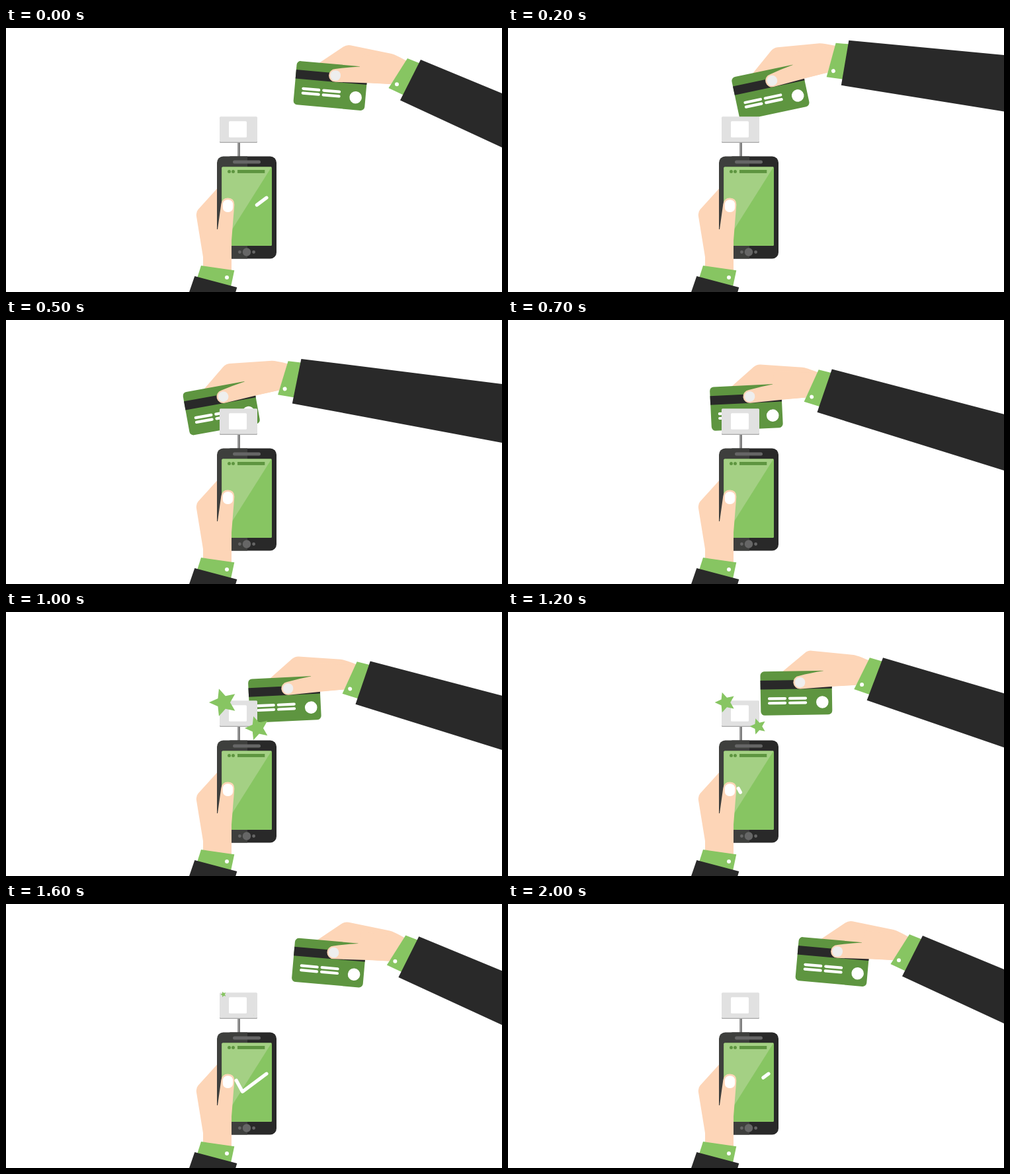
An HTML page that plays this animation: 750x400 px, repeating every 2.1 s.

```html
<!DOCTYPE html>
<html lang="en">
<head>
<meta charset="utf-8">
<title>Card payment</title>
<style>
  html, body { margin: 0; width: 100%; height: 100%; overflow: hidden; background: #fff; }
  svg { display: block; width: 750px; height: 400px; }
  .skin { fill: #fdd5b7; }
  .green { fill: #87c562; }
  .deep { fill: #5e9540; }
  .dark { fill: #292929; }
  .grey { fill: #666; }
  .white { fill: #fff; }
  .line { fill: none; stroke: #fff; stroke-linecap: round; stroke-linejoin: round; }
</style>
</head>
<body>
<svg viewBox="0 0 750 400">
  <g id="arm">
    <path class="skin" d="M470 56 L475 52 L510 28.5 Q515 25 521 26.2 L583 39 Q588 40 606 50 L582 85 L500 80Z"/>
    <g transform="translate(440.1 49.6) rotate(5.1)">
      <rect class="deep" width="108" height="66.5" rx="6"/>
      <rect class="dark" y="13.5" width="108" height="13.5"/>
      <path class="line" stroke-width="4.2" d="M13 41.2H37M44 41.2H68M13 48H37M44 48H68"/>
      <circle class="white" cx="93.2" cy="47.5" r="9.3"/>
    </g>
    <path class="skin" d="M535 58.5 Q515 59.5 498 62 A9.9 9.9 0 0 0 498 81.8 L551 83.5 L582 85 L606 50 L540 40Z"/>
    <rect x="490.4" y="64.2" width="15.6" height="15.6" rx="7.4" fill="#eee"/>
    <path class="green" d="M607 46 L627 54 L602 102 L578.5 91Z"/>
    <circle class="white" cx="591" cy="85.3" r="3"/>
    <path id="sleeve" class="dark"/>
  </g>

  <rect x="350" y="173" width="4" height="22" fill="#999"/>
  <rect x="352" y="173" width="2" height="22" fill="#7d7d7d"/>
  <rect x="323" y="136" width="57" height="38" rx="1.5" fill="#a6a6a6"/>
  <rect x="323" y="134.3" width="57" height="38.5" rx="1.5" fill="#e1e1e1"/>
  <rect class="white" x="337" y="141.3" width="27" height="24.5" rx="1.5"/>

  <rect class="dark" x="330" y="194.5" width="79" height="155" rx="9.5"/>
  <path fill="#3e3f3d" d="M365 194.5 H328.5 A9.5 9.5 0 0 0 319 204 V340 A9.5 9.5 0 0 0 328.5 349.5 H365Z"/>
  <rect class="grey" x="343" y="200.5" width="42" height="5" rx="2.5"/>
  <rect class="green" x="326.3" y="210.5" width="75.7" height="119.5" rx="1.5"/>
  <path fill="#a4d084" d="M326.3 212 Q326.3 210.5 327.8 210.5 H401.5 L326.3 330Z"/>
  <g class="deep">
    <circle cx="337.5" cy="217.4" r="2.5"/>
    <circle cx="343.5" cy="217.4" r="2.5"/>
    <rect x="350" y="215" width="41.3" height="4.9"/>
  </g>
  <g class="grey">
    <circle cx="353.4" cy="339.5" r="2.4"/>
    <circle cx="364" cy="339.5" r="6.2"/>
    <circle cx="374.6" cy="339.5" r="2.4"/>
  </g>
  <path id="check" class="line" stroke-width="5.2" pathLength="1" d="M348.2 267.3 L357.5 284.3 L394 257.2"/>

  <path class="skin" d="M319 243.5 L290.5 275 Q287 279 288 285.5 L298 347 V363 L341 368 V322 L345.3 268 Q345.5 257.5 335.5 257.5 Q326.5 257.5 325.3 267 L320 305 H319Z"/>
  <rect class="white" x="327.8" y="260.2" width="15.4" height="18.8" rx="7"/>
  <path class="green" d="M295 360 L345.3 367.3 L340 392 L289 379Z"/>
  <circle class="white" cx="334" cy="378" r="3"/>
  <path class="dark" d="M285.3 376 L349.3 393 L347 401 H276.7Z"/>

  <path id="starA" class="green"/>
  <path id="starB" class="green"/>
</svg>
<script>
const LOOP = 2100, STEP = 100;

// Arm poses: x and y of the card's emblem, rotation in degrees.
const REST = [528.5, 105, 0];
const SWIPE_FROM = [379.7, 144.5, -7.85];
const SWIPE_TO = [461, 144.5, -7.85];
const approach = [
  { at: 0, pose: REST },
  { at: 100, pose: [487, 88.6, -9] },
  { at: 200, pose: [438, 102.3, -17.1] },
  { at: 400, pose: [364.5, 133, -20.8] },
  { at: 600, pose: SWIPE_FROM }
];

const byId = id => document.getElementById(id);
const ramp = (t, from, to) => Math.min(1, Math.max(0, (t - from) / (to - from)));
const ease = (t, from, to) => {
  const k = ramp(t, from, to);
  return k * k * (3 - 2 * k);
};
const mix = (a, b, k) => a.map((v, i) => v + (b[i] - v) * k);

// Smooth curve through the keys, with slopes taken from each key's neighbours.
function spline(keys, t) {
  const n = Math.min(keys.length - 2, keys.findLastIndex(key => key.at <= t));
  const slope = (j, i) => {
    const a = keys[Math.max(0, j - 1)], b = keys[Math.min(keys.length - 1, j + 1)];
    return (b.pose[i] - a.pose[i]) / (b.at - a.at);
  };
  const a = keys[n], b = keys[n + 1], span = b.at - a.at;
  const k = (t - a.at) / span, s = ease(k, 0, 1);
  return mix(a.pose, b.pose, s).map((v, i) =>
    v + span * k * (1 - k) * ((1 - k) * slope(n, i) - k * slope(n + 1, i)));
}

function armPose(t) {
  if (t < 600) return spline(approach, t);
  if (t < 1000) return mix(SWIPE_FROM, SWIPE_TO, ramp(t, 600, 1000));
  const [x, y] = mix(SWIPE_TO, REST, ease(t, 1000, 1680));
  return [x, y, SWIPE_TO[2] * (1 - ease(t, 1000, 1640))];
}

function drawArm(t) {
  const [x, y, turn] = armPose(t);
  byId("arm").setAttribute("transform",
    `translate(${x} ${y}) rotate(${turn}) translate(${-REST[0]} ${-REST[1]})`);

  // The sleeve's lower edge opens slightly as the arm lifts.
  const angle = (24.9 + .0046 * turn * turn) * Math.PI / 180;
  const far = [596 + 500 * Math.cos(angle), 109.5 + 500 * Math.sin(angle)];
  byId("sleeve").setAttribute("d", `M627 48 L1077 234.5 L${far} L596 109.5Z`);
}

// The tick is drawn, then wiped from its start; the wipe runs on into the next loop.
function drawCheck(t) {
  const carried = t < 1000;
  const from = ramp(carried ? t + 1955 : t, 1700, 2055);
  const to = carried ? 1 : ease(t, 1150, 1400);
  const check = byId("check");
  check.setAttribute("visibility", to > from ? "visible" : "hidden");
  check.setAttribute("stroke-dasharray", `${Math.max(0, to - from)} 2`);
  check.setAttribute("stroke-dashoffset", -from);
}

function drawStar(id, x, y, size) {
  const points = Array.from({ length: 10 }, (_, i) => {
    const r = i % 2 ? size * .47 : size;
    const a = Math.PI * (1 + i / 5);
    return `${x + r * Math.cos(a)} ${y + r * Math.sin(a)}`;
  });
  byId(id).setAttribute("d", size > 0 ? `M${points.join("L")}Z` : "");
}

function render(t) {
  drawArm(t);
  drawCheck(t);
  const burst = (peak, end) => peak * (ramp(t, 700, 1000) - ramp(t, 1000, end));
  const a = burst(21.8, 1760), b = burst(19, 1610);
  drawStar("starA", 328.7, 137, a);
  drawStar("starB", 374.7 + .28 * b, 168 + .42 * b, b);
}

const begin = performance.now();
function tick() {
  const t = (performance.now() - begin) % LOOP;
  render(Math.floor(t / STEP) * STEP);
  requestAnimationFrame(tick);
}
tick();
</script>
</body>
</html>
```
